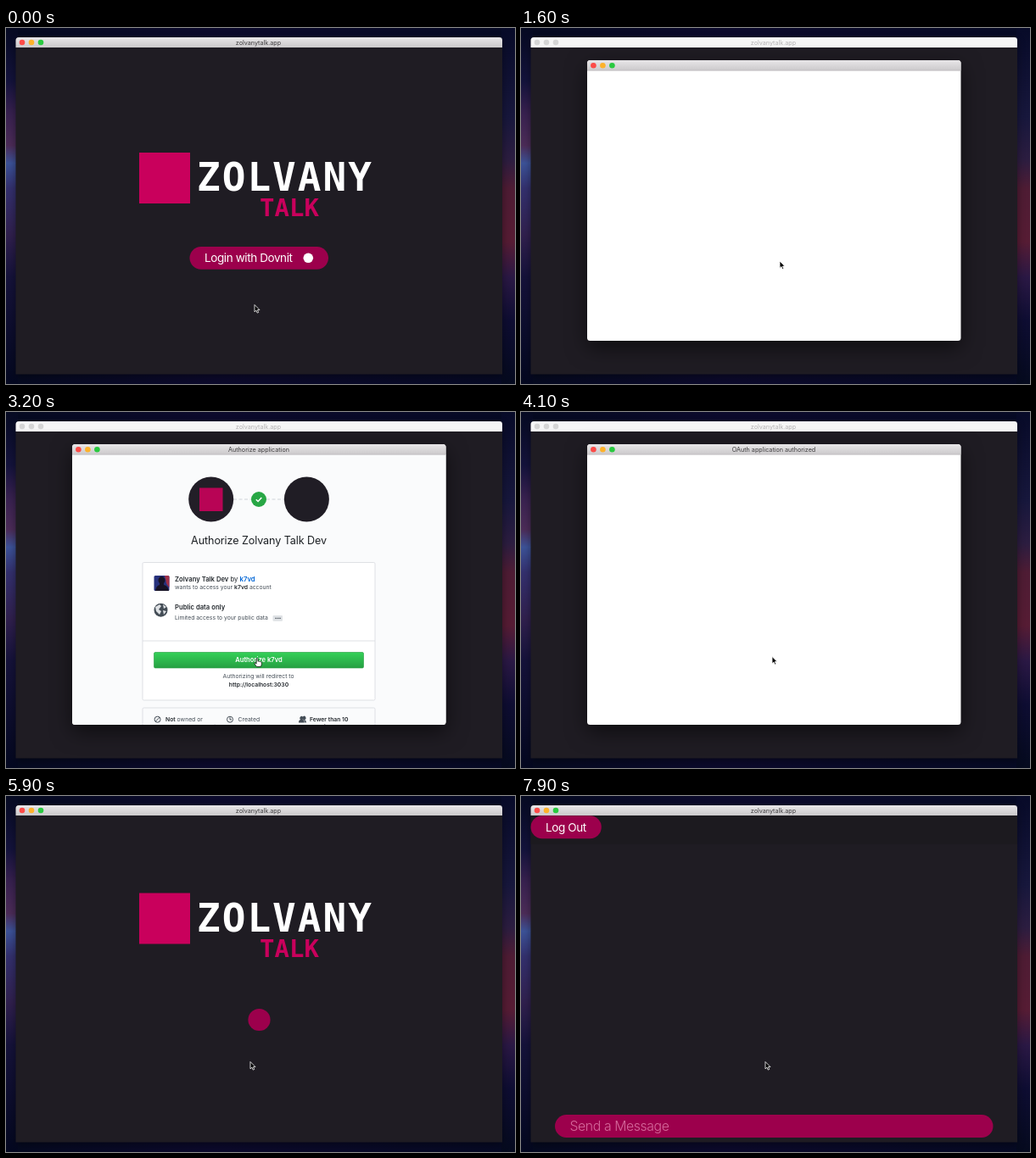
An HTML page for the animation above (8000 ms loop, 600 by 420 pixels).

```html
<!DOCTYPE html>
<html lang="en">
<head>
<meta charset="utf-8">
<title>Login flow</title>
<style>
html, body { margin: 0; width: 100%; height: 100%; overflow: hidden; background: #060a22; }
svg { display: block; width: 100vw; height: 100vh; font-family: Inter, Roboto, sans-serif; }
text { white-space: pre; }
.mid { text-anchor: middle; }
.b { font-weight: 600; }
.pill { fill: #9c004c; }
.ui { font-size: 13.5px; letter-spacing: -.4px; fill: #fff; }
.mark { font-family: "DejaVu Sans Mono", monospace; font-weight: 700; }
.small { font-size: 6.8px; fill: #444d56; }
.strong { fill: #24292e; font-weight: 600; }
.bar { font-size: 7.2px; text-anchor: middle; }
.card { stroke: #d1d5da; stroke-width: .7; }
#main { filter: drop-shadow(0 3px 5px rgba(0, 0, 0, .4)); }
#popup { filter: drop-shadow(0 8px 12px rgba(0, 0, 0, .55)); }
</style>
</head>
<body>
<svg viewBox="0 0 600 420" preserveAspectRatio="none">
  <defs>
    <linearGradient id="west" x2="0" y2="1">
      <stop offset="0" stop-color="#060a22"/>
      <stop offset=".15" stop-color="#14133c"/>
      <stop offset=".24" stop-color="#382150"/>
      <stop offset=".33" stop-color="#4c2c58"/>
      <stop offset=".38" stop-color="#3c5298"/>
      <stop offset=".45" stop-color="#33306e"/>
      <stop offset=".58" stop-color="#30204e"/>
      <stop offset=".7" stop-color="#15123a"/>
      <stop offset="1" stop-color="#040820"/>
    </linearGradient>
    <linearGradient id="east" x2="0" y2="1">
      <stop offset="0" stop-color="#070a28"/>
      <stop offset=".25" stop-color="#17173c"/>
      <stop offset=".37" stop-color="#2c1d40"/>
      <stop offset=".45" stop-color="#4e1c34"/>
      <stop offset=".6" stop-color="#561c34"/>
      <stop offset=".7" stop-color="#2a1844"/>
      <stop offset=".82" stop-color="#0e0d32"/>
      <stop offset="1" stop-color="#050a1e"/>
    </linearGradient>
    <linearGradient id="sky">
      <stop offset="0" stop-color="#050a20"/>
      <stop offset=".4" stop-color="#0c0a2c"/>
      <stop offset="1" stop-color="#060a24"/>
    </linearGradient>
    <linearGradient id="chrome" x2="0" y2="1">
      <stop offset="0" stop-color="#e8e6e8"/>
      <stop offset="1" stop-color="#cbc9cb"/>
    </linearGradient>
    <linearGradient id="green" x2="0" y2="1">
      <stop offset="0" stop-color="#34d058"/>
      <stop offset="1" stop-color="#26a042"/>
    </linearGradient>
    <clipPath id="popupClip"><rect x="78" y="38" width="440.5" height="331" rx="3.5"/></clipPath>
  </defs>

  <rect width="600" height="420" fill="url(#sky)"/>
  <rect width="14" height="420" fill="url(#west)"/>
  <rect x="584" width="16" height="420" fill="url(#east)"/>

  <g id="main">
    <path d="M11.5 23V14.5a3.5 3.5 0 0 1 3.5-3.5H581.5a3.5 3.5 0 0 1 3.5 3.5V23V408.5H11.5Z" fill="#1f1c23"/>
    <path id="mainBar" d="M11.5 23V14.5a3.5 3.5 0 0 1 3.5-3.5H581.5a3.5 3.5 0 0 1 3.5 3.5V23Z"/>
    <g id="mainDots"></g>
    <text id="mainTitle" class="bar" x="297.5" y="19.7">zolvanytalk.app</text>
  </g>

  <g id="brand">
    <rect x="157" y="147" width="60" height="60" fill="#c9005c"/>
    <text class="mark" x="225" y="192" font-size="46" letter-spacing="2" fill="#fff">ZOLVANY</text>
    <text class="mark" x="299" y="222" font-size="29" fill="#c9005c">TALK</text>
  </g>

  <g id="login">
    <rect class="pill" x="216.5" y="258" width="163.5" height="26.7" rx="13.35"/>
    <text class="ui" x="234" y="276">Login with Dovnit</text>
    <circle cx="356.3" cy="271.3" r="5.8" fill="#fff"/>
  </g>

  <circle id="ball" class="pill" cx="298.5" r="13.1"/>

  <g id="chat">
    <rect x="11.5" y="23" width="573.5" height="34" fill="#1c1a1f"/>
    <rect class="pill" x="11.5" y="23.3" width="83.3" height="26.9" rx="13.4"/>
    <text class="ui" x="29" y="41.8">Log Out</text>
    <rect class="pill" x="40" y="376" width="516.5" height="27" rx="13.5"/>
    <text x="57.5" y="395.3" font-size="15.8" font-weight="300" letter-spacing="-.4" fill="#d66b9d">Send a Message</text>
  </g>

  <g id="popup">
    <g clip-path="url(#popupClip)">
      <rect x="78" y="38" width="441" height="331" fill="#fff"/>
      <g id="page">
        <rect x="78" y="50" width="441" height="319" fill="#fafbfc"/>
        <path d="M268 103H328" stroke="#cfd4d9" stroke-dasharray="4 2.5"/>
        <circle cx="241.7" cy="103" r="26.5" fill="#221e27"/>
        <rect x="228" y="89.5" width="27.5" height="27.5" fill="#b80455"/>
        <circle cx="354.4" cy="103" r="26.5" fill="#201d25"/>
        <circle cx="298" cy="103" r="9" fill="#28a745"/>
        <path d="M294.8 103.2l2.3 2.3 4.2-4.6" fill="none" stroke="#fff" stroke-width="1.5"/>
        <text class="mid" x="298" y="156" font-size="12.6" letter-spacing="-.1" fill="#1b1f23">Authorize Zolvany Talk Dev</text>

        <rect class="card" x="161" y="177.5" width="274" height="162.5" rx="1.5" fill="#fff"/>
        <path class="card" d="M161 270H435"/>
        <rect x="174.5" y="193" width="18" height="18" rx="1.5" fill="#27317c"/>
        <path d="M176 211q1-6 5-7v-2a4 4.5 0 1 1 5 0v2q5 1 6 7Z" fill="#171225"/>
        <path d="M187 193h4a1.5 1.5 0 0 1 1.5 1.5V207q-4-4-4-8Z" fill="#a03048"/>
        <text x="199" y="199.6" font-size="7.7" fill="#24292e"><tspan class="b">Zolvany Talk Dev</tspan> by <tspan class="b" fill="#0366d6">k7vd</tspan></text>
        <text class="small" x="199" y="209.2">wants to access your <tspan class="strong">k7vd</tspan> account</text>

        <circle cx="182.5" cy="233.7" r="8" fill="#444d56"/>
        <path d="M176 230l5-3 2 2-3 4 3 2-2 4-4-4ZM185 227l4 3-3 2ZM185 234l4 1-3 4Z" fill="#dfe2e5"/>
        <text class="b" x="199" y="233.4" font-size="7.7" fill="#24292e">Public data only</text>
        <text class="small" x="199" y="245.4">Limited access to your public data</text>
        <rect x="314.5" y="240" width="11.5" height="6.8" rx="1" fill="#dfe2e5"/>
        <path d="M317.5 243.4H324" stroke="#444d56" stroke-width="1.4" stroke-dasharray="1.4 1"/>

        <g id="approve">
          <rect x="174.5" y="283.5" width="247" height="18.5" rx="1.5" fill="url(#green)" stroke="#239a3d" stroke-width=".6"/>
          <text class="mid b" x="298" y="295.4" font-size="7.6" fill="#fff">Authorize k7vd</text>
        </g>
        <text class="small mid" x="297.5" y="313.6">Authorizing will redirect to</text>
        <text class="small strong mid" x="298" y="323.8">http://localhost:3030</text>

        <rect class="card" x="161" y="349" width="274" height="60" rx="1.5" fill="#fafbfc"/>
        <g fill="none" stroke="#444d56">
          <circle cx="178.6" cy="362.7" r="3.5"/>
          <path d="M176.2 365.1l4.8-4.8"/>
          <circle cx="264" cy="362.7" r="3.5"/>
          <path d="M264 360.2v2.7h2"/>
        </g>
        <path d="M345 366.5q0-3 2.4-3.4a2 2.2 0 1 1 2 0q2.4.4 2.4 3.4ZM350 362.4a2 2.2 0 1 1 1.8.7q2.2.6 2.2 3.4h-1.6q0-2.8-2.4-4.1Z" fill="#444d56"/>
        <text class="small" x="188" y="365"><tspan class="strong">Not</tspan> owned or</text>
        <text class="small" x="273.5" y="365">Created</text>
        <text class="small strong" x="358" y="365">Fewer than 10</text>
        <text class="small" x="188" y="373.6">operated by Dovnit</text>
        <text class="small" x="273.5" y="373.6">less than a day ago</text>
        <text class="small strong" x="358" y="373.6">Dovnit users</text>
      </g>
      <rect x="78" y="38" width="441" height="12.2" fill="url(#chrome)"/>
      <path d="M78 50.2H519" stroke="#b3b1b3" stroke-width=".6"/>
      <g id="popupDots"></g>
      <text id="popupTitle" class="bar" x="298" y="46.8" fill="#3c3a3c"></text>
    </g>
  </g>

  <g id="cursor" stroke="#fff" stroke-width=".8" fill="#000">
    <path id="arrow" d="M0 0V8.4L1.9 6.6 3.2 9.6 4.7 9 3.4 6.1H6Z"/>
    <path id="hand" d="M-.9 0q.9-1 1.8 0V3.2q1-.6 1.6.2 1-.5 1.5.3 1.3-.2 1.3 1V7L4.3 9.5H-.6L-3 6q-.6-1.4.7-1.2L-.9 6Z" fill="#fff" stroke="#000" stroke-width=".7"/>
  </g>
</svg>
<script>
const LOOP = 8000, OPEN = 1200, LOADED = 1700, ENABLED = 2700, APPROVED = 3600, CLOSED = 4600, CHAT = 7300;
const $ = id => document.getElementById(id);
const show = (id, on) => $(id).setAttribute('display', on ? 'inline' : 'none');
const set = (id, name, value) => $(id).setAttribute(name, value);
const clamp = v => Math.min(1, Math.max(0, v));
const ease = v => v * v * (3 - 2 * v);

// Cursor stops: time, x, y
const path = [[0, 293, 326.5], [200, 293, 326.5], [800, 305, 275], [1900, 305, 275], [2700, 296, 291],
  [3600, 296, 291], [3800, 296, 288.5], [5100, 296, 288.5], [5800, 288, 313.5], [LOOP, 288, 313.5]];

function cursorAt(t) {
  const i = path.findIndex(p => p[0] > t);
  const [t0, x0, y0] = path[i - 1], [t1, x1, y1] = path[i];
  const k = ease((t - t0) / (t1 - t0));
  return [x0 + (x1 - x0) * k, y0 + (y1 - y0) * k];
}

function dots(id, x, y) {
  $(id).innerHTML = ['#fc4b48', '#fdb22b', '#29c940']
    .map((c, i) => `<circle cx="${x + 11 * i}" cy="${y}" r="3.3" fill="${c}"/>`).join('');
}
dots('mainDots', 19, 17);
dots('popupDots', 85.4, 44.2);

function draw(t) {
  const popup = t >= OPEN && t < CLOSED;
  const page = t >= LOADED && t < APPROVED;
  const loading = t >= CLOSED && t < CHAT;

  set('mainBar', 'fill', popup ? '#f6f6f6' : 'url(#chrome)');
  set('mainTitle', 'fill', popup ? '#b4b2b4' : '#3c3a3c');
  for (const dot of $('mainDots').children) dot.style.fill = popup ? '#d5d5d5' : '';

  show('brand', t < CHAT);
  set('brand', 'transform', `translate(0 ${loading ? -32.5 : 0})`);
  show('login', t < CLOSED);
  show('ball', loading);
  set('ball', 'cy', 263 + 10 * Math.sin(2 * Math.PI * t / 1000 + .727));
  show('chat', t >= CHAT);

  const grow = ease(clamp((t - OPEN + 100) / 300));
  show('popup', popup);
  set('popup', 'opacity', grow);
  set('popup', 'transform', `translate(298 203) scale(${.85 + .15 * grow}) translate(-298 -203)`);
  show('page', page);
  set('approve', 'opacity', t < ENABLED ? .5 : 1);
  $('popupTitle').textContent = t < LOADED ? '' : page ? 'Authorize application' : 'OAuth application authorized';

  const [x, y] = cursorAt(t);
  const overLogin = t < OPEN && y < 284;
  const overApprove = page && t >= ENABLED;
  set('cursor', 'transform', `translate(${x} ${y})`);
  show('hand', overLogin || overApprove);
  show('arrow', !(overLogin || overApprove));
}

function tick() {
  draw(Math.floor(performance.now() % LOOP / 100) * 100);
  requestAnimationFrame(tick);
}
tick();
</script>
</body>
</html>
```
